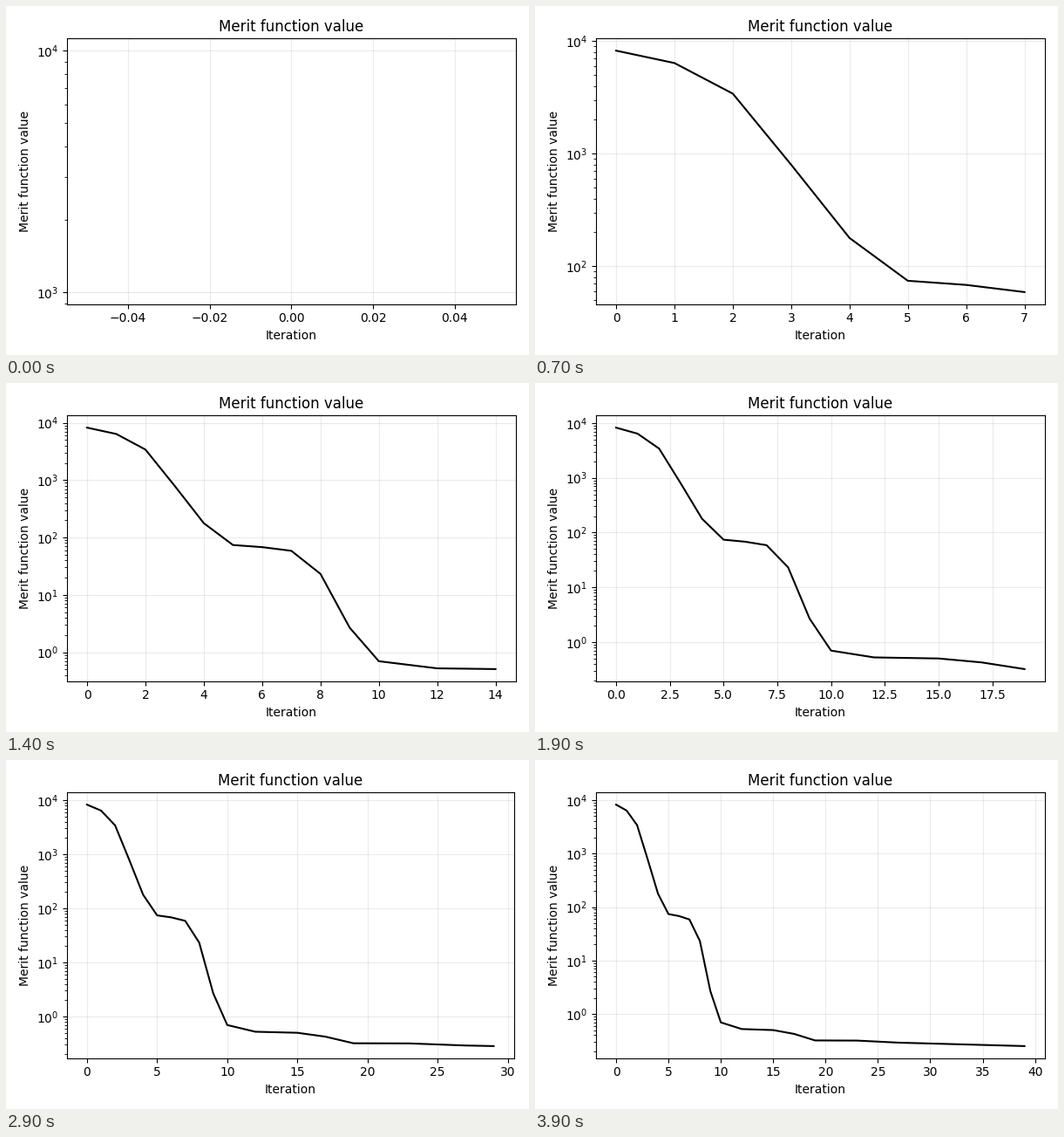
Animation of 600 by 400 pixels, one loop 6500 ms. Source, as a matplotlib script:

```python
import matplotlib.pyplot as plt
import numpy as np
from matplotlib.animation import FuncAnimation

STEP_MS = 100
LOOP_MS = 6500
ITERATIONS = 40

# Bends of the curve; the merit decays geometrically between them.
BENDS = {0: 8250, 1: 6400, 2: 3420, 3: 798, 4: 178, 5: 74, 6: 68, 7: 58.7,
         8: 23.2, 9: 2.68, 10: 0.696, 12: 0.523, 15: 0.5, 17: 0.424,
         19: 0.32, 23: 0.318, 27: 0.291, 39: 0.251}

steps = np.arange(ITERATIONS)
merit = np.exp(np.interp(steps, list(BENDS), np.log(list(BENDS.values()))))

fig = plt.figure(figsize=(6, 4), dpi=100)


def draw(i):
    """Plot the history up to iteration i, then hold the full curve."""
    n = min(i + 1, ITERATIONS)
    fig.clear()
    fig.subplots_adjust(left=0.125, right=0.9, bottom=0.11, top=0.88)
    ax = fig.add_subplot()
    ax.semilogy(steps[:n], merit[:n], color="black", lw=1.5)
    ax.set_title("Merit function value")
    ax.set_xlabel("Iteration")
    ax.set_ylabel("Merit function value")
    ax.grid(True, alpha=0.25)
    fig.tight_layout()
    return []


anim = FuncAnimation(fig, draw, frames=LOOP_MS // STEP_MS, interval=STEP_MS,
                     repeat=True, repeat_delay=0)
plt.show()
```
